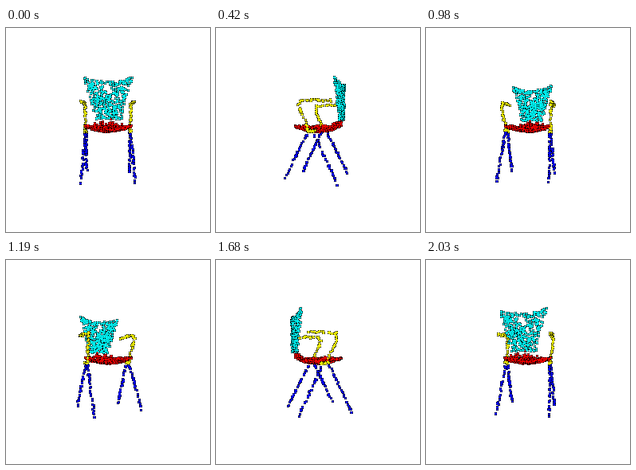
Recreate the animation shown at these times as a matplotlib script. Size 256 by 256 pixels, loop 2100 ms.

```python
import numpy as np
import matplotlib.pyplot as plt
from matplotlib.animation import FuncAnimation
from matplotlib.colors import to_rgb

SIZE, DPI = 256, 100
FRAMES, STEP_MS = 30, 70
CENTER = (128, 125)
CAMERA = 275  # distance from the turning axis, in pixels

BLUE, CYAN, YELLOW, RED = map(to_rgb, ("#0000ff", "#00ffff", "#ffff00", "#ff0000"))

# Each dot is a 3 x 3 ball: bright core, dark corners that lie further back.
DX, DY = (grid.ravel() for grid in np.meshgrid([-1, 0, 1], [-1, 0, 1]))
RADIUS2 = DX**2 + DY**2
SHADE = np.array([1, 0.8, 0])[RADIUS2]
SINK = np.array([0, 1.5, 4])[RADIUS2]

rng = np.random.default_rng(8)


def along(path, count, jitter):
    """Scatter points around a 3D polyline."""
    path = np.array(path, float)
    lengths = np.linalg.norm(np.diff(path, axis=0), axis=1)
    knots = np.r_[0, np.cumsum(lengths)]
    t = rng.uniform(0, knots[-1], count)
    points = np.column_stack([np.interp(t, knots, axis) for axis in path.T])
    return points + rng.uniform(-jitter, jitter, points.shape)


def make_seat(count=520):
    r = np.sqrt(rng.random(count))
    a = rng.uniform(0, 2 * np.pi, count)
    x, y = 29.5 * r * np.cos(a), 29.5 * r * np.sin(a)
    z = -4.5 + 6.5 * r**2 + rng.uniform(-1, 1, count)
    z += 36 * np.clip(y / 29.5 - 0.7, 0, None) * rng.random(count)
    return np.column_stack([x, y, z])


def make_back(count=400):
    u = rng.uniform(-1, 1, 3 * count)
    v = rng.random(3 * count)
    half = 15.5 + 13 * v**1.3
    keep = rng.random(3 * count) < half / 28.5
    x = u * half
    z = 9 + v * (43 + 6 * np.abs(u) ** 2.5)
    keep &= ((x + 1) / 4) ** 2 + ((z - 45) / 4) ** 2 > 1
    y = 30.5 - 3 * (x / 28) ** 2 + rng.uniform(-1, 1, 3 * count)
    return np.column_stack([x, y, z])[keep][:count]


def make_arm(side):
    rail = along([(29 * side, -5, 6), (30 * side, -14, 25),
                  (30 * side, -12, 30), (30 * side, 6, 31),
                  (30 * side, 25, 29)], 46, 1.2)
    base = along([(29 * side, -5, 6), (28 * side, -3, -4),
                  (28 * side, 7, -4)], 20, 1.5)
    return np.vstack([rail, base])


def make_leg(side, end):
    return along([(28 * side, 4 * end, -7), (29 * side, 15 * end, -28),
                  (30 * side, 32 * end, -62)], 36, 1)


parts = [(make_seat(), RED), (make_back(), CYAN)]
for side in (-1, 1):
    parts.append((make_arm(side), YELLOW))
    parts += [(make_leg(side, end), BLUE) for end in (-1, 1)]

cloud = np.vstack([points for points, _ in parts])
colors = np.vstack([[color] * len(points) for points, color in parts])
shaded = (colors[:, None] * SHADE[None, :, None]).reshape(-1, 3)


def project(angle):
    """Turn the cloud and return screen positions with depth."""
    x, y, z = cloud.T
    c, s = np.cos(angle), np.sin(angle)
    depth = y * c - x * s
    scale = CAMERA / (CAMERA - depth)
    return (CENTER[0] + scale * (x * c + y * s),
            CENTER[1] - scale * z, depth)


def render(frame):
    """Paint all balls from back to front."""
    px, py, depth = project(2 * np.pi * frame / FRAMES)
    cols = (np.floor(px).astype(int)[:, None] + DX).ravel()
    rows = (np.floor(py).astype(int)[:, None] + DY).ravel()
    order = np.argsort((depth[:, None] - SINK).ravel())
    canvas = np.ones((SIZE, SIZE, 3))
    canvas[rows[order], cols[order]] = shaded[order]
    return canvas


fig = plt.figure(figsize=(SIZE / DPI, SIZE / DPI), dpi=DPI, facecolor="white")
ax = fig.add_axes([0, 0, 1, 1])
ax.axis("off")
picture = ax.imshow(render(0), interpolation="nearest", aspect="auto")


def update(frame):
    picture.set_data(render(frame))
    return (picture,)


anim = FuncAnimation(fig, update, frames=FRAMES, interval=STEP_MS,
                     repeat=True, repeat_delay=0)
plt.show()
```
